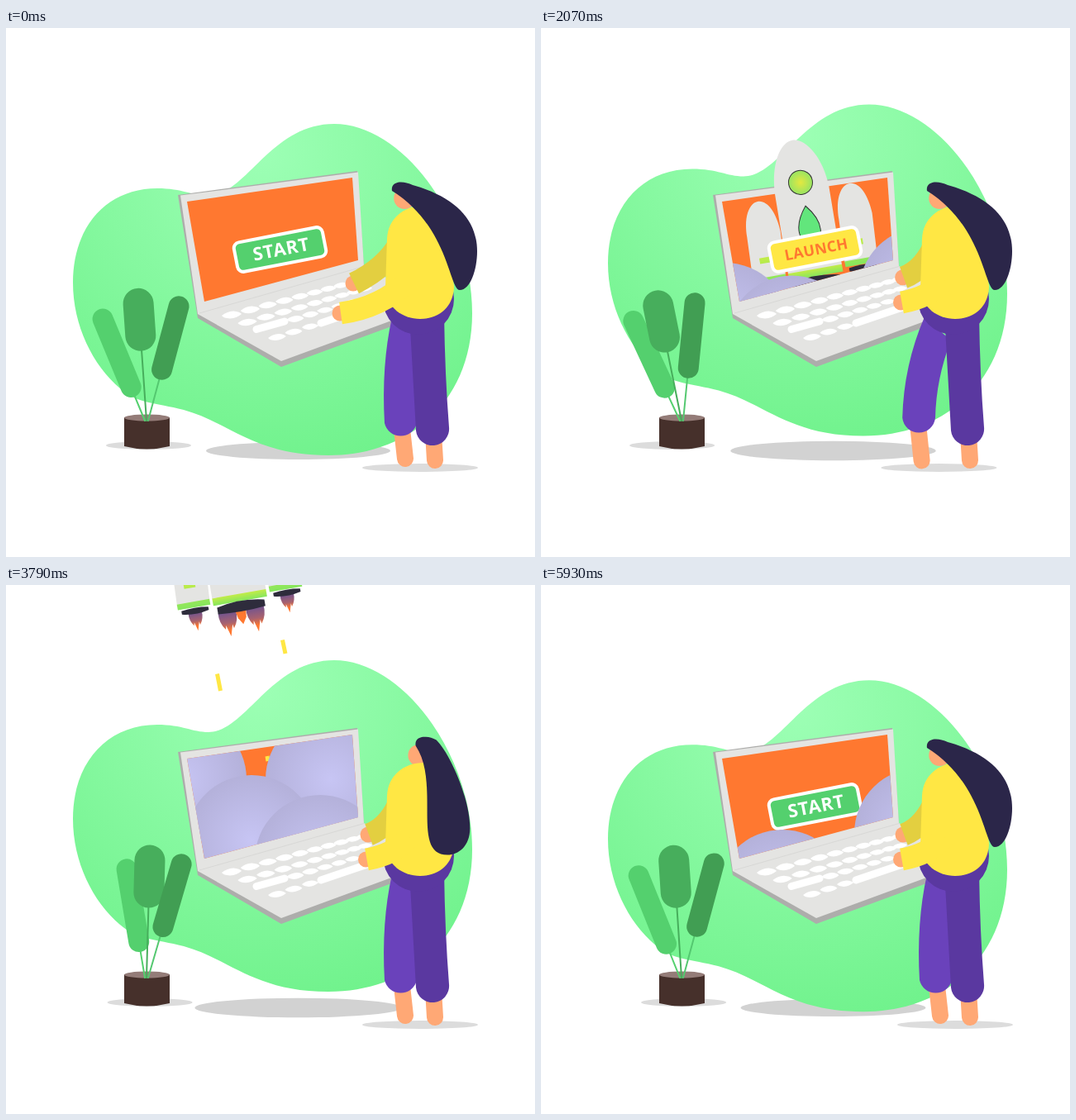
Write an HTML page that moves like this. It is 640 px wide and 640 px high and loops after 6 s.

```html
<!DOCTYPE html>
<html lang="en">
<head>
<meta charset="utf-8">
<title>Launch</title>
<style>
html, body { margin: 0; width: 100%; height: 100%; overflow: hidden; background: #fff; }
svg { display: block; width: 100vw; height: 100vh; }
text { font: 700 22px "Open Sans", "Noto Sans", sans-serif; text-anchor: middle; }
.skin { fill: #ffa875; }
.limb { stroke: #ffa875; stroke-width: 20; stroke-linecap: round; }
.arm { fill: none; stroke-width: 27; }
</style>
</head>
<body>
<svg viewBox="0 0 640 640">
<defs>
  <radialGradient id="green" gradientUnits="userSpaceOnUse" cx="310" cy="150" r="390">
    <stop stop-color="#9dffb5"/><stop offset="1" stop-color="#70f28c"/>
  </radialGradient>
  <radialGradient id="puff"><stop stop-color="#c7c5f4"/><stop offset="1" stop-color="#b4b1da"/></radialGradient>
  <radialGradient id="glass"><stop stop-color="#e4e840"/><stop offset="1" stop-color="#98e462"/></radialGradient>
  <linearGradient id="lime" x2="0" y2="1"><stop stop-color="#c2ec48"/><stop offset="1" stop-color="#86e65e"/></linearGradient>
  <linearGradient id="fire" x2="0" y2="1">
    <stop stop-color="#70538f"/><stop offset=".45" stop-color="#a8626f"/><stop offset=".75" stop-color="#ff7830"/>
  </linearGradient>
  <clipPath id="screen"><path d="M219 210L419 181L426 281L240 331Z"/></clipPath>
  <clipPath id="sky"><path d="M240 331L219 210L110 -400H419V181L426 281Z"/></clipPath>
  <path id="key" d="M-12 1Q-6-4 2-4.500Q10-4 12-1Q6 4-2 4.500Q-10 4-12 1Z"/>
  <path id="flame" fill="url(#fire)" d="M-11 0Q-12 12-5 21L-4 16L0 30L4 16L5 21Q12 12 11 0Z"/>
  <g id="booster">
    <use href="#flame" transform="translate(-2 105) scale(.75)"/>
    <path fill="#e4e4e2" d="M0 0C12 0 20 17 21 40L18 93H-22L-20 40C-20 17-11 0 0 0Z"/>
    <path fill="url(#lime)" d="M-22 92H18V99H-22ZM-10 68H4V75H-10Z"/>
    <path fill="#2e2c3c" d="M-18 101Q-2 98 15 101V105Q-2 109-18 105Z"/>
  </g>
</defs>

<ellipse id="blobShade" cx="353.500" cy="511.500" fill="#d2d2d2"/>
<path id="blob" fill="url(#green)" d="M81 308C81 240 122 194 183 194C214 194 225 203 245 203C290 203 320 116 397 116C480 116 564 230 564 345C564 450 490 517 390 517C300 517 270 477 215 462C180 453 160 455 138 436C105 408 81 360 81 308Z"/>

<ellipse id="potShade" cy="505" rx="51.500" ry="5" fill="#dcdcdc"/>
<path fill="#46302b" d="M143 471H198V506Q170 513 143 506Z"/>
<ellipse cx="170.500" cy="471.500" rx="27.500" ry="4" fill="#947c78"/>
<g id="leaves" stroke-linecap="round"></g>

<path fill="#adadab" d="M208 202L425 173L433 288L490 320L480 356L333 410L232 351Z"/>
<path fill="#e4e4e2" d="M211 202.500L426 174.500L433 288L495 320L480 349L333 403L232 346Z"/>
<path stroke="#d8d8d6" d="M234 345L433 288.500"/>
<path fill="#ff7830" d="M219 210L419 181L426 281L240 331Z"/>
<g id="keys" fill="#fff"><path stroke="#fff" stroke-width="9" stroke-linecap="round" d="M303 364.500L337 355M381 357L440 337"/></g>

<g clip-path="url(#sky)">
  <path id="dashes" fill="none" stroke="#ffe744" stroke-width="5" d="M255.500 107.500L259.500 128M334.500 66.500L338 83M316 207L317 213"/>
  <g id="rocket">
    <use href="#booster" transform="translate(262 210) rotate(-10)"/>
    <use href="#booster" transform="translate(373 188) rotate(-10)"/>
    <g transform="translate(303 136) rotate(-10)">
      <use href="#flame" x="-17" y="177"/>
      <use href="#flame" x="17" y="177"/>
      <path fill="#ff7830" d="M-7 178H6L5 187L0 195L-5 187Z"/>
      <path fill="#e4e4e2" d="M1 0C17 0 34 27 35 62L34 159H-32L-31 62C-30 27-15 0 1 0Z"/>
      <rect x="-32" y="158" width="66" height="9" fill="url(#lime)"/>
      <path fill="#2e2c3c" d="M-28 170Q1 163 30 170V178Q1 181-28 178Z"/>
      <circle cx="2" cy="52" r="14.500" fill="url(#glass)" stroke="#333"/>
      <path fill="#62e67c" stroke="#333" d="M3 81Q17 98 16 112Q15 125 3 128Q-10 125-10 112Q-11 98 3 81Z"/>
    </g>
  </g>
</g>
<g transform="translate(331.500 268) rotate(-11)">
  <rect id="button" x="-54.500" y="-18" width="109" height="36" rx="7" stroke="#fff" stroke-width="4"/>
  <text id="label" x="1.500" y="7.500"></text>
</g>
<g id="clouds" clip-path="url(#screen)"></g>

<ellipse id="bodyShade" cy="532" rx="70" ry="5" fill="#dcdcdc"/>
<circle id="backHand" class="skin" r="9.500"/>
<path id="backArm" class="arm" stroke="#e3cf40"/>
<path id="foot" class="limb"/>
<path class="limb" d="M517 490L519 523"/>
<path id="leg" fill="#6a42bb"/>
<path fill="#5a38a0" d="M488 345H530Q531 420 536 483A20 20 0 0 1 496 487Z"/>
<circle cx="499" cy="328" r="43" fill="#5a38a0"/>
<circle id="face" class="skin" cy="206" r="13"/>
<path fill="#ffe744" d="M508 215C482 214 462 230 461 255L459 315C460 338 480 352 501 352C526 352 542 335 542 312L530 235Z"/>
<circle id="frontHand" class="skin" r="9.500"/>
<path id="frontArm" class="arm" stroke="#ffe744"/>
<path id="hair" fill="#2b2649"/>
</svg>

<script>
const LOOP = 6000;
const $ = id => document.getElementById(id);
const set = (el, attrs) => { for (const k in attrs) el.setAttribute(k, attrs[k]); };
const add = (parent, tag, attrs) => {
  const el = document.createElementNS("http://www.w3.org/2000/svg", tag);
  set(el, attrs);
  return parent.appendChild(el);
};

const span = (t, from, to) => Math.min(1, Math.max(0, (t - from) / (to - from)));
const ramp = (t, from, to) => { const u = span(t, from, to); return u * u * (3 - 2 * u); };
const pulse = (t, a, b, c, d) => ramp(t, a, b) - ramp(t, c, d);
const mix = (a, b, u) => a.map((v, i) => v + (b[i] - v) * u);
// straight moves through the points, one at each stop
const along = (stops, points, t) =>
  points.reduce((p, q, i) => mix(p, q, span(t, stops[i - 1], stops[i])));

function addKeys(count, x0, y0, slope, step, bend) {
  for (let i = 0; i < count; i++) {
    const dx = step * i - bend * i * i, scale = 1.48 - (x0 + dx) / 570;
    add($("keys"), "use", { href: "#key", transform: `translate(${x0 + dx} ${y0 - slope * dx}) scale(${scale})` });
  }
}
addKeys(10, 273, 347, .27, 23, .58);
addKeys(9, 292, 356, .285, 23, .65);
addKeys(5, 350, 352, .3, 18.5, .3);
addKeys(3, 328, 374, .32, 20, 0);

// plant: a value swings from a to b to c and home again
const sway = (a, b, c, t) => along([0, 2000, 4000, LOOP], [[a], [b], [c], [a]], t)[0];
function leaf(x, near, far, width, color, stem, ...swing) {
  const g = add($("leaves"), "g", {});
  add(g, "path", { d: `M0 0V${-near}`, stroke: stem, "stroke-width": 2 });
  add(g, "path", { d: `M0 ${-near}V${-far}`, stroke: color, "stroke-width": width });
  return t => set(g, { transform: `translate(${x} 475) rotate(${sway(...swing, t)})` });
}
const leaves = [
  leaf(168, 44, 133, 25, "#54d06e", "#54d06e", -22.5, -25.6, -7.6),
  leaf(170, 103, 142, 37, "#47ae5c", "#47ae5c", -4, -12, 3.2),
  leaf(172, 64, 143, 25, "#419e53", "#54c870", 15, 5.2, 17.6)
];

// clouds: drift in from hiding, cover the screen, return to hiding at the time `home`
function cloud(home, hidden, ...path) {
  const el = add($("clouds"), "circle", { r: 79, fill: "url(#puff)" });
  return t => {
    const [cx, cy] = along([1100, 2640, 3790, 5000, home], [hidden, ...path, hidden], t < 1100 ? 0 : t);
    set(el, { cx, cy });
  };
}
const clouds = [
  cloud(5930, [176, 380], [250, 353], [212, 235], [230, 222]),
  cloud(6250, [490, 330], [448, 314], [393, 235], [365, 215]),
  cloud(6250, [301, 400], [305, 366], [297, 309], [266, 302]),
  cloud(6250, [400, 402], [402, 352], [380, 333], [382, 300])
];

// arm poses: bend and cuff
const backPose = { left: [464, 288, 421, 309], rest: [466, 292, 439, 302], press: [435, 261, 384, 259] };
const frontPose = { left: [455, 338, 405, 345], rest: [470, 326, 436.5, 332] };
function drawArm(name, shoulder, [bx, by, x, y]) {
  set($(name + "Arm"), { d: `M${shoulder}Q${bx} ${by} ${x} ${y}` });
  set($(name + "Hand"), { cx: x - 1, cy: y });
}
function drawArms(t) {
  const settle = ramp(t, 0, 560);
  const reach = pulse(t, 0, 600, 1000, 1420) + pulse(t, 2050, 2480, 2850, 3300);
  drawArm("back", [480, 253], mix(mix(backPose.left, backPose.rest, settle), backPose.press, reach));
  drawArm("front", [488, 305], mix(frontPose.left, frontPose.rest, settle));
}

function drawLeg(t) {
  const k = pulse(t, 40, 640, 1880, 2540), y = 478 - 8 * k;
  set($("leg"), {
    d: `M${467 - 4 * k} 350Q${454 - 19 * k} 408 ${458 - 26 * k} ${y}A20 20 0 0 0 ${497 - 25 * k} ${y}` +
       `Q${494 - 20 * k} ${420 + 5 * k} 496 ${350 + 35 * k}Z`
  });
  set($("foot"), { d: `M${479 - 28 * k} 485L${483 - 28 * k} ${521 + 3 * k}` });
  set($("bodyShade"), { cx: 501 - 24.5 * k });
}

// head poses: crown, outer side, tip, then the two pulls on the inner edge
const headPose = {
  ahead: [467, 197, 570, 270, 549, 317, 536, 536],
  down: [469, 198, 560, 290, 531, 335, 507, 518],
  up: [500, 194, 560, 298, 532, 328, 482, 525]
};
function drawHead(t) {
  const nod = pulse(t, 0, 650, 900, 1600) + pulse(t, 2540, 2950, 2980, 3350);
  const rise = pulse(t, 3350, 3920, 5200, 5750);
  const [x, y, ox, oy, tx, ty, low, high] =
    mix(mix(headPose.ahead, headPose.down, nod), headPose.up, rise);
  set($("hair"), {
    d: `M${x} ${y}C${x - 2} ${y - 12} ${x + 13} ${y - 13} ${x + 25} ${y - 7}` +
       `C${ox - 25} ${y + 8} ${ox} ${oy - 37} ${ox} ${oy}` +
       `C${ox} ${oy + 22} ${tx + 13} ${ty} ${tx} ${ty}C${low} ${ty} ${high} 240 ${x} ${y}Z`
  });
  set($("face"), { cx: 202 + .6 * x });
}

// shift along the tilted launch axis, positive is down
const slide = d => `translate(${d * .174} ${d * .985})`;
function drawRocket(t) {
  const below = 230 * (1 - ramp(t, 1000, 1800));
  const launch = 285 * (Math.max(0, t - 3180) / 610) ** 2;
  set($("rocket"), { transform: slide(below - launch) });
  set($("dashes"), { transform: slide((3790 - t) * .55) });
}

function drawButton(t) {
  const armed = t >= 620 && t < 2500, label = $("label");
  set($("button"), { fill: armed ? "#ffe744" : "#54d06e" });
  set(label, { fill: armed ? "#ff7830" : "#fff", y: armed ? 6.5 : 7.5 });
  label.textContent = armed ? "LAUNCH" : "START";
  label.style.fontSize = armed ? "18px" : "22px";
  label.style.letterSpacing = armed ? ".3px" : ".8px";
}

function draw(t) {
  const lift = 1 - Math.abs(t / 3000 - 1);
  set($("blob"), { transform: `translate(0 ${-34 * lift})` });
  set($("blobShade"), { rx: 111.5 + 18.5 * lift, ry: 10.5 + 1.8 * lift });
  set($("potShade"), { cx: sway(172.5, 158, 176, t) });
  for (const move of [...leaves, ...clouds, drawRocket, drawButton, drawArms, drawLeg, drawHead]) move(t);
}

let start;
function tick(now) {
  start ??= now;
  draw((now - start) % LOOP);
  requestAnimationFrame(tick);
}
draw(0);
requestAnimationFrame(tick);
</script>
</body>
</html>
```
